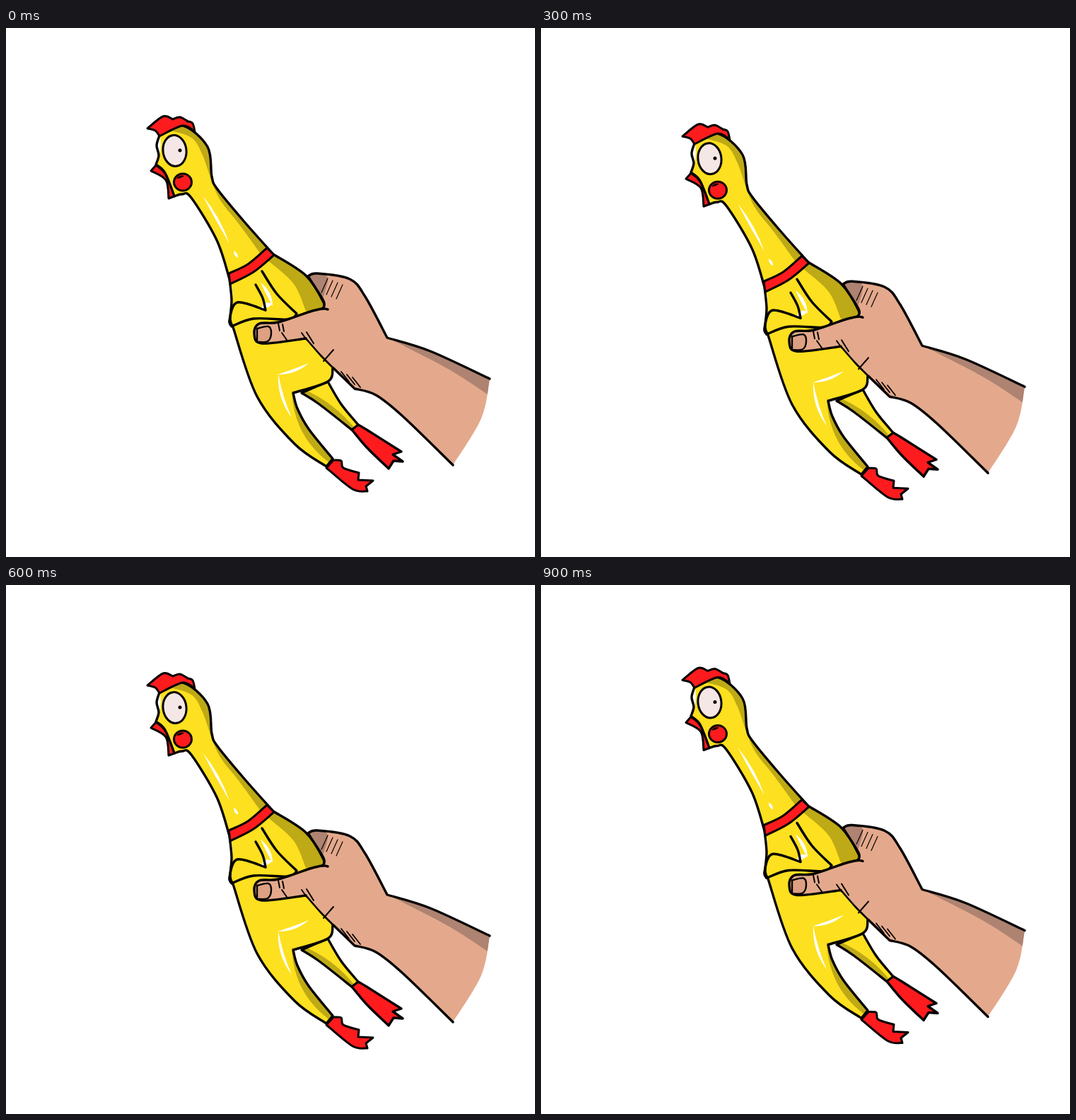
Animation of 748x748 px, one loop 1000 ms. Source, as an HTML page with a canvas:

```html
<!DOCTYPE html>
<html lang="en">
<head>
<meta charset="utf-8">
<title>Rubber chicken</title>
<style>
html, body { margin: 0; width: 100%; height: 100%; overflow: hidden; background: #fff; }
canvas { display: block; }
</style>
</head>
<body>
<canvas id="stage" width="748" height="748"></canvas>
<script>
const ctx = document.getElementById('stage').getContext('2d');

const YELLOW = '#fde01f', OLIVE = '#bea916', RED = '#fd1b1e';
const SKIN = '#e4a98c', SKIN_DARK = '#ae8371', INK = '#050202', WHITE = '#fff';

// Smooth curve through "x,y" points; "|" marks a sharp corner.
function curve(text, closed) {
  const path = new Path2D();
  let last = null;
  for (const part of text.split('|')) {
    const pts = part.trim().split(/\s+/).map(p => p.split(',').map(Number));
    if (last) pts.unshift(last);
    else path.moveTo(...pts[0]);
    for (let i = 0; i < pts.length - 1; i++) {
      const b = pts[i], c = pts[i + 1], a = pts[i - 1] || b, d = pts[i + 2] || c;
      path.bezierCurveTo(
        b[0] + (c[0] - a[0]) / 6, b[1] + (c[1] - a[1]) / 6,
        c[0] - (d[0] - b[0]) / 6, c[1] - (d[1] - b[1]) / 6, c[0], c[1]);
    }
    last = pts[pts.length - 1];
  }
  if (closed) path.closePath();
  return path;
}

const shape = text => curve(text, true);

function fill(path, color) {
  ctx.fillStyle = color;
  ctx.fill(path);
}

function line(path, width = 3.4) {
  ctx.lineWidth = width;
  ctx.strokeStyle = INK;
  ctx.stroke(path);
}

function part(path, color, width) {
  fill(path, color);
  line(path, width);
}

function inside(path, draw) {
  ctx.save();
  ctx.clip(path);
  draw();
  ctx.restore();
}

// Tapered brush mark from one point to another, bowed and thickest halfway.
function brush(x0, y0, x1, y1, width, bow = 0, color = WHITE) {
  const dx = x1 - x0, dy = y1 - y0, len = Math.hypot(dx, dy);
  const mx = (x0 + x1) / 2, my = (y0 + y1) / 2;
  const bend = k => [mx - dy / len * k, my + dx / len * k];
  ctx.fillStyle = color;
  ctx.beginPath();
  ctx.moveTo(x0, y0);
  ctx.quadraticCurveTo(...bend(bow + width), x1, y1);
  ctx.quadraticCurveTo(...bend(bow - width), x0, y0);
  ctx.fill();
}

// Row of parallel thin strokes.
function hatch(count, x, y, stepX, stepY, dx, dy, width) {
  ctx.lineWidth = width;
  ctx.strokeStyle = INK;
  ctx.beginPath();
  for (let i = 0; i < count; i++) {
    ctx.moveTo(x + i * stepX, y + i * stepY);
    ctx.lineTo(x + i * stepX + dx, y + i * stepY + dy);
  }
  ctx.stroke();
}

const body = shape(`217,152 250,138 285,168 291,210 299,228 337,274 378,320 |
  424,350 449,388 447,397 | 462,481 | 455,500 406,516 | 412,538 428,567 462,609 |
  453,620 | 408,588 355,521 321,423 | 317,412 319,385 316,355 |
  298,300 262,240 249,235 238,238 | 225,205 212,193 | 216,180 213,166 217,152`);
const bodyShade = shape(`228,144 262,155 278,180 291,218 | 304,245 330,278 359,318 |
  372,330 407,362 424,400 | 455,400 430,340 378,312 | 300,215 285,150 250,130`);
const comb = shape(`200,142 222,125 236,129 | 246,126 257,132 | 264,135 267,147 |
  250,138 217,153 | 211,145 200,142`);
const beak = shape('205,202 212,194 | 225,206 238,238 | 230,241 | 226,215 205,202');
const collar = shape('315,347 342,334 369,311 | 379,321 | 350,345 317,362 | 315,347');
const wing = curve(`362,344 383,376 411,404 | 400,412 350,411 319,422 |
  316,413 327,388 367,399 | 363,382 353,363`);

const backLeg = shape('418,516 455,500 | 474,532 498,561 | 490,569 | 443,532 418,516');
const backFoot = shape(`489,568 498,561 | 510,568 559,599 | 547,603 | 561,613 |
  548,612 | 541,623 | 510,593 489,568`);
const frontFoot = shape(`453,622 463,611 | 474,612 477,622 499,629 |
  498,639 | 519,640 | 509,648 | 511,655 | 490,652 453,622`);

const handTop = '427,351 440,347 486,355 508,380 539,438 | 600,457 684,496';
const armBottom = '632,618 561,549 523,519 493,510 | 463,481';
const palm = '463,481 445,463 424,439';
const thumb = '424,439 362,446 351,432 358,418 385,416 430,401 448,397';
const hand = shape(`${handTop} | 672,552 632,618 | ${armBottom} | ${palm} | ${thumb} | 449,386 427,351`);
const outlines = [handTop, armBottom, thumb + ' 455,398', '427,351 449,386 448,397'].map(t => curve(t));
const palmLine = curve(palm);
const nail = shape('355,425 371,422 375,432 370,443 355,444');
const fingerShade = shape('425,350 440,345 455,354 447,386');
const wristShade = shape('540,438 625,482 681,518 | 690,480');

function drawLegs() {
  fill(backLeg, YELLOW);
  inside(backLeg, () => brush(408, 506, 500, 575, 24, 6, OLIVE));
  line(backLeg);
  part(backFoot, RED);
}

function drawBody() {
  fill(body, YELLOW);
  inside(body, () => {
    fill(bodyShade, OLIVE);
    brush(404, 512, 465, 620, 18, 14, OLIVE);
    brush(217, 148, 212, 196, 8, 0);
    brush(278, 237, 316, 305, 4, -3);
    brush(322, 315, 328, 325, 4);
    brush(318, 360, 319, 390, 4);
    brush(322, 424, 354, 516, 5, 7);
    brush(384, 490, 428, 474, 4, 5);
    brush(385, 489, 404, 551, 4, 8);
    brush(360, 360, 377, 393, 5, -4);
    brush(377, 390, 361, 398, 7, 4);
  });
  line(body);
  line(wing);
  for (const red of [collar, comb, beak, frontFoot]) part(red, RED, 3);
}

function oval(x, y, rx, ry, tilt, color) {
  const path = new Path2D();
  path.ellipse(x, y, rx, ry, tilt, 0, Math.PI * 2);
  part(path, color, 3);
}

function drawFace() {
  oval(238.5, 173.5, 16.5, 22, -0.12, '#f5e7e6');
  oval(246, 173, 1, 1, 0, INK);
  oval(250, 218, 12.5, 12, 0, RED);
  brush(241, 213, 252, 209, 3, -1, INK);
}

function drawHand() {
  fill(hand, SKIN);
  inside(hand, () => {
    fill(wristShade, SKIN_DARK);
    fill(fingerShade, SKIN_DARK);
  });
  outlines.forEach(p => line(p));
  line(palmLine, 2.6);
  part(nail, '#dda083', 2.4);
  hatch(2, 385, 418, 6, 1, 2, 10, 2);
  hatch(2, 390, 431, 28, 0, 7, 10, 2);
  hatch(1, 463, 455, 0, 0, -14, 16, 2);
  hatch(1, 425, 430, 0, 0, 10, 16, 2);
  hatch(3, 474, 486, 8, 4, 11, 14, 1.8);
  hatch(4, 455, 354, 7, 3, -9, 20, 1.2);
}

// Seconds of the loop in tenths: slow push down, then a quick shake up and back.
const offset = step => step <= 4 ? step * 3.75 : Math.abs(step - 8) * 7.5 - 15;

function frame(now) {
  const step = Math.floor(now % 1000 / 100);
  ctx.fillStyle = WHITE;
  ctx.fillRect(0, 0, 748, 748);
  ctx.save();
  ctx.translate(0, offset(step));
  ctx.lineJoin = ctx.lineCap = 'round';
  drawLegs();
  drawBody();
  drawFace();
  drawHand();
  ctx.restore();
  requestAnimationFrame(frame);
}
requestAnimationFrame(frame);
</script>
</body>
</html>
```
